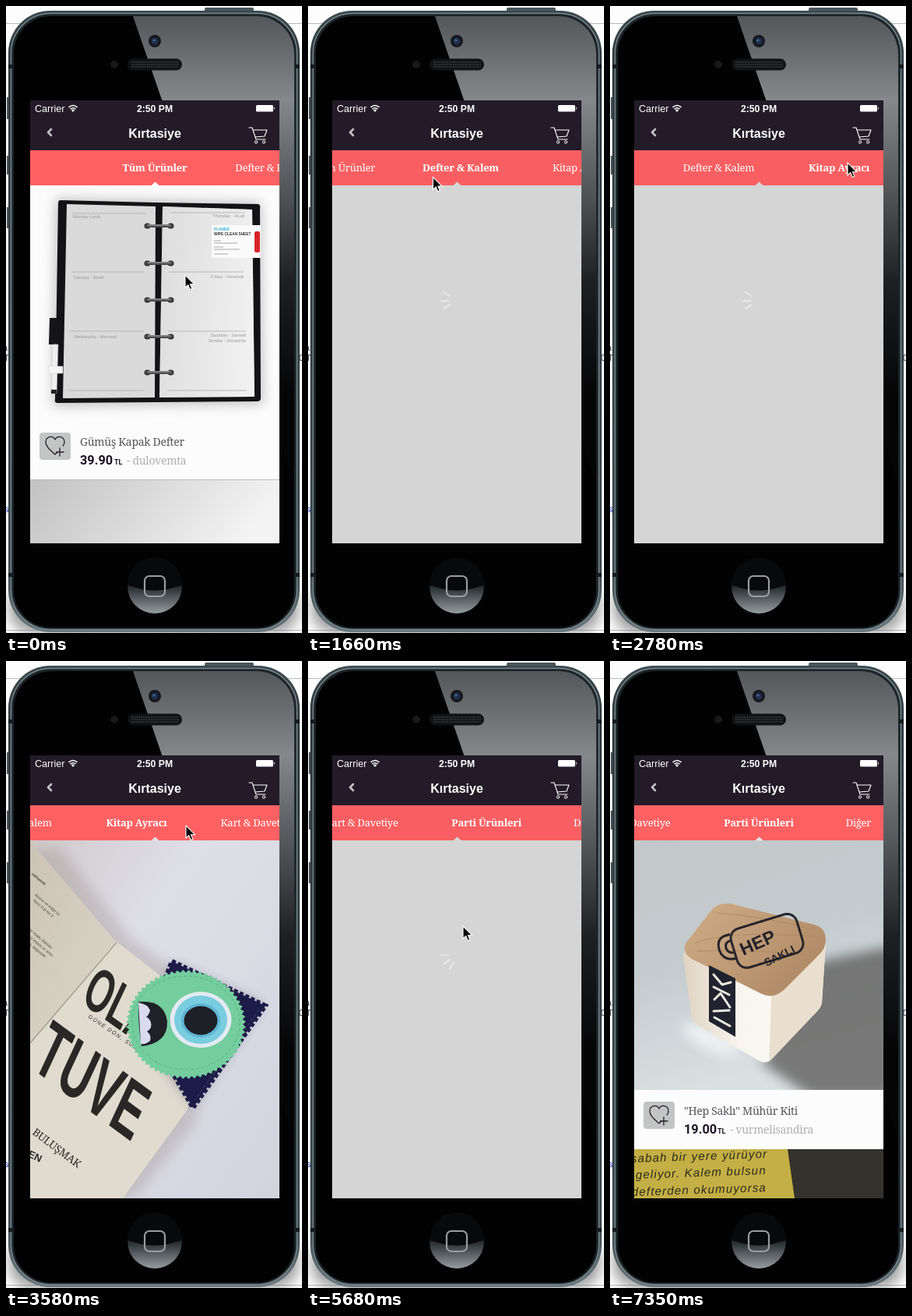
These frames come from a looping animation (380x804 px, 7590 ms). An HTML page:

```html
<!DOCTYPE html>
<html lang="tr">
<head>
<meta charset="utf-8">
<title>Kırtasiye</title>
<style>
html, body { margin: 0; width: 100%; height: 100%; overflow: hidden; background: #fdfdfd; }
svg { display: block; }
text { font-family: "Liberation Sans", Arial, sans-serif; }
.slab { font-family: "Noto Serif", serif; letter-spacing: -.02em; }
.tab { font-size: 13px; fill: #fff; text-anchor: middle; }
.on { font-weight: 700; }
.name { font-size: 14px; font-weight: 300; fill: #55545a; }
.shop { font-size: 14px; fill: #aeaeb0; }
.price { font: 700 16.3px Roboto, sans-serif; fill: #1c1426; }
.tl { font: 700 9px Roboto, sans-serif; fill: #1c1426; }
.day { font-size: 5.5px; fill: #999; }
.line { fill: none; stroke-linecap: round; stroke-linejoin: round; }
.title { font: 700 100px Roboto, sans-serif; }
.hand { font: italic 500 15px Lato, cursive; fill: #2c2a1c; }
</style>
</head>
<body>
<svg width="380" height="804" viewBox="0 0 380 804">
<defs>
  <clipPath id="screen"><rect x="31" y="121" width="320" height="568"/></clipPath>
  <clipPath id="view"><rect x="31" y="230" width="320" height="459"/></clipPath>
  <clipPath id="body"><rect x="10" y="13" width="360" height="784" rx="48"/></clipPath>
  <linearGradient id="steel" x2="0" y2="1">
    <stop stop-color="#3c4a4f"/><stop offset=".1" stop-color="#2c373b"/>
    <stop offset=".9" stop-color="#3b4a4f"/><stop offset="1" stop-color="#6b7a80"/>
  </linearGradient>
  <linearGradient id="glare" gradientUnits="userSpaceOnUse" x1="0" y1="13" x2="0" y2="500">
    <stop stop-color="#54575a"/><stop offset=".22" stop-color="#85888b"/>
    <stop offset=".45" stop-color="#55585b"/><stop offset=".7" stop-color="#1d1f21"/><stop offset="1" stop-color="#050506"/>
  </linearGradient>
  <linearGradient id="gloss" x2="0" y2="1">
    <stop offset=".5" stop-color="#14171a"/><stop offset=".5" stop-color="#23282b"/><stop offset="1" stop-color="#969da1"/>
  </linearGradient>
  <linearGradient id="silver" x2="1" y2=".2">
    <stop stop-color="#c2c2c2"/><stop offset=".5" stop-color="#dadada"/><stop offset="1" stop-color="#f3f3f3"/>
  </linearGradient>
  <linearGradient id="desk" x2=".4" y2="1">
    <stop stop-color="#d3d5d6"/><stop offset=".35" stop-color="#e3e2e0"/><stop offset="1" stop-color="#d4d0c9"/>
  </linearGradient>
  <linearGradient id="cover" x2="1" y2="1">
    <stop stop-color="#2d2c33"/><stop offset=".5" stop-color="#1b1a20"/><stop offset="1" stop-color="#45444c"/>
  </linearGradient>
  <linearGradient id="sheet" x2="1" y2="1">
    <stop stop-color="#d0cacb"/><stop offset=".35" stop-color="#dfdfe8"/><stop offset="1" stop-color="#d3d3de"/>
  </linearGradient>
  <linearGradient id="paper" x2=".6" y2="1">
    <stop stop-color="#cbc3b4"/><stop offset="1" stop-color="#dcd7cb"/>
  </linearGradient>
  <linearGradient id="floor" x2=".3" y2="1">
    <stop stop-color="#c3c9ca"/><stop offset=".5" stop-color="#c4cbce"/><stop offset="1" stop-color="#dbe0e2"/>
  </linearGradient>
  <linearGradient id="wood" x2="1" y2=".6">
    <stop stop-color="#d0ad88"/><stop offset="1" stop-color="#b08a66"/>
  </linearGradient>
  <linearGradient id="side" x2="1"><stop stop-color="#e0d3c1"/><stop offset=".4" stop-color="#f8f4ee"/><stop offset="1" stop-color="#fff"/></linearGradient>
  <filter id="soft" x="-30%" y="-30%" width="160%" height="160%"><feGaussianBlur stdDeviation="8"/></filter>
  <g id="like">
    <rect x="43" y="547" width="40" height="35" rx="4" fill="#c3c5c5"/>
    <path class="line" d="M66 572L63 575C58 570 51 566 51 559C51 552 60 550 63 556C66 550 75 552 75 559Q75 562 73 564M69 567v10M64.500 572h9.500" stroke="#241c29" stroke-width="1.300"/>
  </g>
</defs>

<!-- page behind the phone -->
<path d="M0 22.500H380M0 800.500H380" stroke="#b5bac0"/>
<g font-size="11" fill="#334"><text x="-4" y="442">a</text><text x="-3" y="455">T</text><text x="376" y="455">0</text><text x="-2" y="649" fill="#23c">s</text></g>

<!-- phone -->
<rect x="4" y="740" width="372" height="64" rx="30" fill="#444" opacity=".5" filter="url(#soft)"/>
<rect x="255" y="2" width="63" height="10" rx="2" fill="#49565b"/>
<path d="M1 117h4v28h-4zM1 192h4v24h-4zM1 258h4v27h-4z" fill="#4b575c"/>
<rect x="3" y="6" width="374" height="797" rx="54" fill="url(#steel)"/>
<rect x="6.500" y="9.500" width="367" height="790" rx="51" fill="#1c2427" stroke="#76868c" stroke-width="1.500"/>
<path d="M3 75h6v5h-6zM371 75h6v5h-6zM3 727h6v5h-6zM371 727h6v5h-6z" fill="#151b1d"/>
<rect x="10" y="13" width="360" height="784" rx="48" fill="#020203"/>
<path d="M163 13H370V612Z" fill="url(#glare)" clip-path="url(#body)"/>
<circle cx="191" cy="45" r="8" fill="#16181d"/><circle cx="191" cy="45" r="4.500" fill="#1d2f4c"/><circle cx="190" cy="44" r="1.600" fill="#466a9d"/>
<circle cx="139" cy="75" r="5" fill="#17181a"/>
<rect x="156" y="67.500" width="70" height="15" rx="7.500" fill="#111214"/>
<path d="M161 72H222M161 75H222M161 78H222" stroke="#3d4043" stroke-width="1.400" stroke-dasharray="1.500 1"/>
<circle cx="191" cy="744" r="35" fill="url(#gloss)"/>
<path d="M156 742A35 35 0 0 1 226 742Q191 757 156 742Z" fill="#08090a"/>
<rect x="178" y="731" width="26" height="26" rx="6" fill="none" stroke="#9a9da0" stroke-width="2.200"/>

<g clip-path="url(#screen)">
  <rect x="31" y="121" width="320" height="568" fill="#d5d5d5"/>
  <g id="spin" class="line" stroke="#f4f4f4" stroke-width="2.600">
    <path d="M180 377h-9" opacity=".45"/><path d="M182 383l-7 5" opacity=".6"/><path d="M186 387l-4 8" opacity=".55"/>
  </g>

  <g clip-path="url(#view)">
    <g class="page">
      <rect x="31" y="230" width="320" height="459" fill="#fcfcfc"/>
      <path d="M64 247L327 252L330 510L60 513Z" fill="#777" opacity=".45" filter="url(#soft)"/>
      <path d="M70 249L191 252L324 254Q327 255 326 260L327 503Q327 507 322 507L66 509Q62 509 63 504L67 253Q67 249 70 249Z" fill="#131315"/>
      <path d="M78 254L192 257L191 502L73 503Z" fill="#dadada"/>
      <path d="M201 257L316 261L319 501L197 502Z" fill="url(#silver)"/>
      <path d="M201 257L316 261L319 501L197 502Z" fill="#eee" opacity=".6"/>
      <path d="M85 266H180M84 341H178M82 417H177M80 493H176M211 265H306M209 341H305M208 417H308M207 493H308" stroke="#aaa" stroke-width=".8"/>
      <g class="day"><text x="86" y="272">Monday-Lundi</text><text x="86" y="350">Tuesday - Mardi</text><text x="87" y="426">Wednesday - Mercredi</text>
        <g text-anchor="end"><text x="306" y="271">Thursday - Jeudi</text><text x="305" y="349">Friday - Vendredi</text><text x="308" y="424">Saturday - Samedi</text><text x="308" y="431">Sunday - Dimanche</text></g></g>
      <g id="rings"></g>
      <rect x="264" y="281" width="63" height="42" fill="#fafafa"/>
      <g font-size="4.800" font-weight="700"><text x="267" y="288" fill="#35b3d8">PLANER</text><text x="267" y="294" fill="#333">WIPE CLEAN SHEET</text></g>
      <path d="M267 301h9M267 304h30M267 309h12M267 312h33M267 318h18" stroke="#aaa" stroke-width="1"/>
      <rect x="319" y="289" width="7" height="27" rx="2" fill="#d9232b"/>
      <path d="M56 400h10v30l-3 4h-8z" fill="#151517"/><path d="M59 434h8l-2 63h-7z" fill="#eee" stroke="#bbb" stroke-width=".6"/><path d="M55 462h18v9h-18z" fill="#f5f5f5" stroke="#ccc" stroke-width=".5"/><path d="M58 492h7v5h-7z" fill="#222"/>
      <rect x="31" y="531" width="320" height="76" fill="#fcfcfc"/>
      <use href="#like"/>
      <text class="slab name" x="95" y="564">Gümüş Kapak Defter</text>
      <text class="price" x="95" y="588">39.90</text><text class="tl" x="139" y="588">TL</text>
      <text class="slab shop" x="155" y="588">- dulovemta</text>
      <path d="M31 607.500H351" stroke="#bdbdbd"/>
      <rect x="31" y="608" width="320" height="81" fill="url(#silver)"/>
    </g>

    <g class="page">
      <rect x="31" y="230" width="320" height="459" fill="url(#desk)"/>
      <path d="M40 556L140 365L338 380L302 600L180 588Z" fill="#5c4b42" opacity=".5" filter="url(#soft)"/>
      <path d="M47 554Q46 560 53 561L290 584Q294 584 295 580L333 374L300 540Z" fill="#3a2a21"/>
      <path d="M50 554L294 576V582L53 560Z" fill="#cfa67c"/>
      <path d="M333 372L295 581" stroke="#e9e5e0" stroke-width="2"/>
      <path d="M141 361L330 371Q333 372 332 375L293 575Q292 577 288 576L50 555Q46 554 48 550L135 364Q137 361 141 361Z" fill="url(#cover)"/>
      <path id="mark" class="line" stroke="#dedee2" stroke-width=".8"/>
    </g>

    <g class="page">
      <rect x="31" y="230" width="320" height="459" fill="url(#sheet)"/>
      <path d="M31 240H70L160 355L250 420L245 590L165 689H31Z" fill="#8f837f" opacity=".3" filter="url(#soft)"/>
      <path d="M31 231L142 361L31 545Z" fill="url(#paper)"/>
      <path d="M142 360L245 440L233 575L150 689H31V490Z" fill="#dfdbcf"/>
      <path d="M142 361L31 490" stroke="#aaa18f" stroke-width="1.500"/>
      <g fill="#4c4841" transform="rotate(40 31 275)" font-size="5"><text x="31" y="273" font-weight="700">saklamak</text><text x="52" y="291">Basım ve Kağıt İşi</text><text x="55" y="298">İkinci Kat No 3</text><text x="72" y="330">Her Hakkı Saklıdır</text><text x="72" y="337">İzinsiz kopya ve alıntı</text><text x="72" y="344">yapmak, dağıtmak</text></g>
      <g fill="#292826">
        <g class="title"><text transform="matrix(.38 .27 -.33 .7 95 437)">OLA</text><text transform="matrix(.49 .36 -.42 .9 31 521)">TUVE</text></g>
        <text transform="translate(105 457) rotate(34)" font-size="7" letter-spacing="1.500" font-style="italic">GÜNE DÖN, SUSMA</text>
        <text class="slab" transform="translate(33 606) rotate(37)" font-size="13.500">BULUŞMAK</text>
        <text transform="translate(20 632) rotate(25)" font-size="13" font-weight="700">TEN</text>
      </g>
      <path d="M213 390L326 441L241 566L190 500Z" fill="#3a355a" opacity=".6" filter="url(#soft)"/>
      <path d="M213 385L333 442L240 573L180 470Z" fill="#1d1b47" stroke="#1d1b47" stroke-width="6" stroke-dasharray="5 3"/>
      <path d="M325 447L243 562" stroke="#45437a" stroke-dasharray="4 3"/>
      <path id="felt" fill="#74cd9e"/>
      <ellipse cx="231" cy="464" rx="69" ry="60" fill="none" stroke="#57b384" stroke-dasharray="4 3"/>
      <path d="M170 437Q203 434 207 462Q208 490 174 494Q169 465 170 437Z" fill="#202127"/>
      <path d="M170 438Q182 440 185 448Q183 455 180 456Q188 461 186 470Q184 474 181 475Q187 480 185 487Q180 492 173 491Z" fill="#dadaef"/>
      <ellipse cx="250" cy="460" rx="39.500" ry="36" fill="#e4eaf2"/><ellipse cx="250" cy="460" rx="34" ry="31" fill="#7accdf"/>
      <ellipse cx="250" cy="461" rx="25" ry="22" fill="#5fb4d4"/><ellipse cx="250" cy="461" rx="21.500" ry="18.500" fill="#1d2026"/>
    </g>

    <g class="page">
      <rect x="31" y="230" width="320" height="320" fill="url(#floor)"/>
      <path d="M195 516L268 385L365 365V560H260Z" fill="#5e5f5d" opacity=".8" filter="url(#soft)"/>
      <ellipse cx="130" cy="485" rx="40" ry="14" fill="#f4f8fa" opacity=".8" filter="url(#soft)" transform="rotate(25 130 485)"/>
      <path d="M95 372L206 412L277 360L272 438Q271 444 266 449L207 511Q200 517 192 513L114 468Q107 464 105 457L94 380Z" fill="url(#side)"/>
      <path d="M208 410L277 360L272 438Q271 444 266 449L204 514Z" fill="#eadfce"/>
      <path d="M97 362L129 321Q138 309 154 311L262 338Q277 342 277 358Q277 369 267 378L224 421Q210 434 195 427L105 382Q92 374 97 362Z" fill="url(#wood)"/>
      <path class="line" d="M108 362Q150 345 262 353M112 372Q180 370 250 376M138 323Q200 328 258 344" stroke="#a58157" stroke-width="1" opacity=".6"/>
      <g class="line" stroke="#26252c" stroke-width="3" transform="rotate(-17 198 361)">
        <rect x="158" y="334" width="88" height="52" rx="13" stroke-dasharray="3 1"/>
        <path d="M158 338H152Q140 339 140 354Q141 369 158 370M157 346Q149 346 149 354Q150 361 157 362"/>
      </g>
      <g fill="#22222a" font-weight="700"><text transform="translate(171 378) rotate(-24)" font-size="23">HEP</text><text transform="translate(201 392) rotate(-27)" font-size="14">SAKLI</text></g>
      <path d="M127 390L161 407V482L127 462Z" fill="#20232f"/>
      <path class="line" d="M133 402l11 13l11 -3M133 418l20 10M134 434l8 -8l12 18M133 449l20 -1M134 457l20 11" stroke="#eee9df" stroke-width="3"/>
      <rect x="31" y="550" width="320" height="76" fill="#fcfcfc"/>
      <use href="#like" y="18"/>
      <text class="slab name" x="95" y="582">"Hep Saklı" Mühür Kiti</text>
      <text class="price" x="95" y="606">19.00</text><text class="tl" x="138" y="606">TL</text>
      <text class="slab shop" x="154" y="606">- vurmelisandira</text>
      <rect x="31" y="626" width="320" height="63" fill="#33322c"/>
      <path d="M31 626H228L237 689H31Z" fill="#c3af45"/>
      <g class="hand" letter-spacing="1.200"><text x="27" y="643" transform="rotate(-2 31 643)">sabah bir yere yürüyor</text><text x="33" y="664" transform="rotate(-2 31 664)">geliyor. Kalem bulsun</text><text x="28" y="686" transform="rotate(-2 31 686)">defterden okumuyorsa</text></g>
    </g>
  </g>

  <!-- header -->
  <rect x="31" y="121" width="320" height="64" fill="#231b28"/>
  <g fill="#fff">
    <text x="37" y="136" font-size="12.600">Carrier</text>
    <text x="191" y="136" font-size="12.200" font-weight="700" text-anchor="middle">2:50 PM</text>
    <text x="191" y="169" font-size="16" font-weight="700" text-anchor="middle">Kırtasiye</text>
    <rect x="321" y="127" width="22" height="8.500" rx="1.500"/><path d="M344 129.500q2 1.700 0 3.500z"/>
    <path d="M86 136l-2.200-2.600q2.200-1.800 4.400 0z"/>
  </g>
  <g class="line" stroke="#fff">
    <path d="M80.500 129.800q5.500-4.600 11 0M82.500 132.200q3.500-2.800 7 0" stroke-width="1.600" stroke-linecap="butt"/>
    <path d="M58 158l-4 4l4 4" stroke="#c3bfc6" stroke-width="2.600"/>
    <path d="M312 156h4l5 15h12M317 159h18l-3 8l-12 1" stroke-width="1.100"/>
    <circle cx="321" cy="174.500" r="1.700"/><circle cx="331" cy="174.500" r="1.700"/>
  </g>
  <rect id="bar" x="31" y="185" width="320" height="45"/>
  <g id="tabs"></g>
  <path id="notch" d="M186 230.500L191.500 225.500L197 230.500Z"/>
</g>

<path id="cursor" d="M0 0V16L3.700 12.600L6.300 18.500L8.900 17.400L6.400 11.700H11.500Z" fill="#000" stroke="#fff" stroke-width="1.100"/>
</svg>
<script>
const $ = id => document.getElementById(id);
const LOOP = 7590, STEP = 87.5;

// label and its centre along the strip
const tabs = [["Tüm Ürünler", 0], ["Defter & Kalem", 149], ["Kitap Ayracı", 303.5],
  ["Kart & Davetiye", 458.5], ["Parti Ürünleri", 619], ["Diğer", 747]];
// first step, selected tab, notch colour
const stages = [[0, 0, "#fcfcfc"], [18, 1, "#e9e9e8"], [31, 2, "#e0dde2"], [65, 4, "#dfe3e4"]];
// step, then values
const pointer = [[0, 230, 345], [9, 294, 206], [10, 289, 208], [17, 150, 222], [18, 143, 222],
  [27, 300, 198], [29, 305, 201], [37, 305, 201], [41, 231, 211], [46, 117, 217],
  [53, 199, 340], [71, 199, 340], [74, 242, 650], [76, 242, 650], [84, 337, 806]];
const strip = [[9, 0], [10, 4], [17, 131.5], [18, 139], [20, 149], [31, 149], [34, 303.5],
  [39, 303.5], [41, 327], [46, 441]];
const coast = [[65, 580.8], [66, 604], [67, 616], [68, 619]];

function at(keys, n) {
  const i = keys.findIndex(k => k[0] > n);
  if (i === 0) return keys[0].slice(1);
  if (i < 0) return keys[keys.length - 1].slice(1);
  const a = keys[i - 1], b = keys[i], p = (n - a[0]) / (b[0] - a[0]);
  return a.slice(1).map((v, j) => v + (b[j + 1] - v) * p);
}

function offset(n) {
  if (n <= 46) return at(strip, n)[0];
  if (n < 65) return 586 - 145 * Math.exp((46 - n) * .175);
  return at(coast, n)[0];
}

function make(parent, tag, attrs, text = "") {
  const el = document.createElementNS("http://www.w3.org/2000/svg", tag);
  for (const k in attrs) el.setAttribute(k, attrs[k]);
  el.textContent = text;
  return parent.appendChild(el);
}

const labels = tabs.map(([name]) => make($("tabs"), "text", { class: "slab tab", y: 212 }, name));
const pages = [...document.querySelectorAll(".page")];

for (const y of [282, 330, 377, 424, 470]) {
  const ring = (d, stroke, width) => make($("rings"), "path", { class: "line", d, stroke, "stroke-width": width });
  ring(`M181 ${y}h1M211 ${y}h1`, "#333", 7);
  ring(`M181 ${y}H212`, "#4a4a4c", 4);
  ring(`M182 ${y - 1}H211`, "#b9b9bb", 1.2);
}

let seed = 7;
const rnd = () => (seed = seed * 16807 % 2147483647) / 2147483647;

// small loose cards scattered along the strokes of the letter
function scatter(x1, y1, x2, y2, count, spread, size) {
  let d = "";
  for (let i = 0; i < count; i++) {
    const p = i / count, turn = rnd() * 6.3;
    const cx = x1 + (x2 - x1) * p + (rnd() - .5) * spread, cy = y1 + (y2 - y1) * p + (rnd() - .5) * spread * .7;
    for (let k = 0; k < 4; k++) {
      const a = turn + k * 1.57 + rnd() * .5;
      d += `${k ? "L" : "M"}${cx + Math.cos(a) * size} ${cy + Math.sin(a) * size * .7}`;
    }
    d += "Z";
  }
  return d;
}
$("mark").setAttribute("d", scatter(154, 408, 122, 496, 46, 24, 7) + scatter(160, 410, 190, 450, 22, 24, 7)
  + scatter(186, 446, 244, 502, 36, 24, 7) + scatter(274, 412, 244, 502, 46, 24, 7) + scatter(268, 404, 297, 397, 8, 5, 3));

const teeth = 64;
let edge = "";
for (let i = 0; i < teeth * 2; i++) {
  const a = i * Math.PI / teeth, r = i % 2 ? 1 : .95;
  edge += `${i ? "L" : "M"}${231 + 77 * r * Math.cos(a)} ${466 + 70 * r * Math.sin(a)}`;
}
$("felt").setAttribute("d", edge + "Z");

function draw(now) {
  const n = Math.floor((now % LOOP + 20) / STEP);
  const k = stages.filter(s => s[0] <= n).length - 1;
  const [from, sel, tint] = stages[k];
  const age = k ? n - from : 9;
  const loading = age < 2;
  pages.forEach((page, i) => {
    page.style.display = i === k && !loading ? "" : "none";
    page.style.opacity = age === 2 ? .5 : 1;
  });
  $("spin").style.display = age < 3 ? "" : "none";
  $("spin").setAttribute("transform", `rotate(${age * 30} 191 377)`);
  $("bar").setAttribute("fill", loading ? "#f95f62" : "#ff6163");
  $("notch").setAttribute("fill", loading ? "#d5d5d5" : tint);
  const s = offset(n);
  labels.forEach((label, i) => {
    label.setAttribute("x", 191 + tabs[i][1] - s);
    label.classList.toggle("on", i === sel);
  });
  $("cursor").setAttribute("transform", `translate(${at(pointer, n)})`);
}

const start = performance.now();
function tick() {
  draw(performance.now() - start);
  requestAnimationFrame(tick);
}
tick();
</script>
</body>
</html>
```
